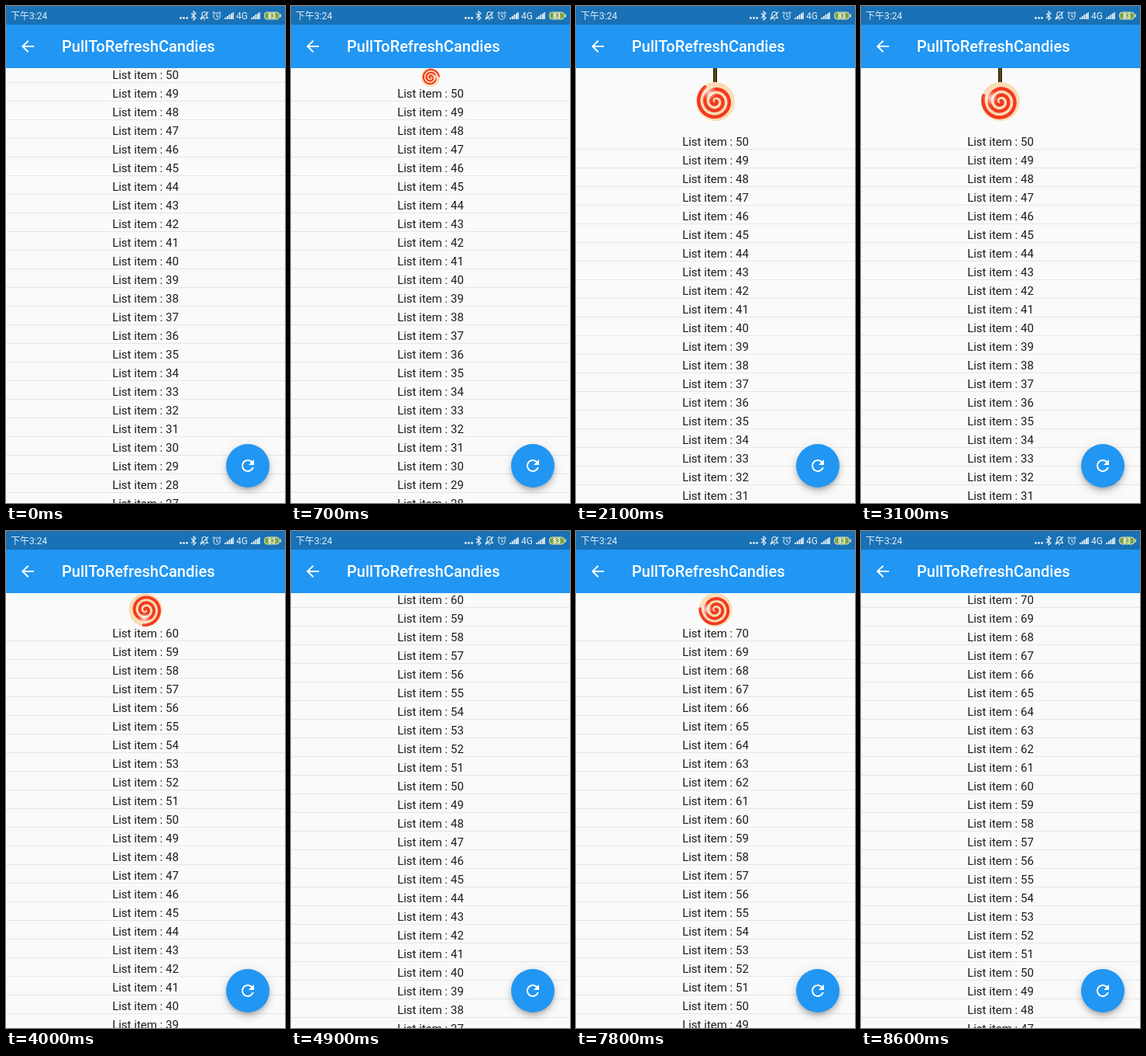
An HTML page for the animation above (8.7 s loop, 360 px wide and 640 px high).

```html
<!DOCTYPE html>
<html lang="en">
<head>
<meta charset="utf-8">
<title>PullToRefreshCandies</title>
<style>
  html, body { margin: 0; width: 100%; height: 100%; overflow: hidden; }
  body { position: relative; background: #fafafa; font-family: Roboto, "Noto Sans CJK SC", "Noto Sans CJK", sans-serif; }
  header { position: absolute; inset: 0 0 auto; height: 80px; background: #2196f3; color: #fff; }
  header svg { position: absolute; left: 0; top: 0; }
  h1 { position: absolute; left: 72px; top: 24px; margin: 0; font-size: 20px; font-weight: 500; line-height: 57px; white-space: nowrap; }
  main { position: absolute; inset: 80px 0 0; overflow: hidden; }
  .row { height: 24px; font-size: 15px; line-height: 18px; text-align: center; color: #1c1c1c; }
  .row::after { content: ""; display: block; height: 1px; background: #e3e7e6; }
  .candy { position: absolute; left: 0; top: 0; }
  .fab { position: absolute; left: 284px; top: 564px; width: 56px; height: 56px; border-radius: 50%; background: #2196f3;
    box-shadow: 0 3px 5px -1px rgba(0,0,0,.2), 0 6px 10px rgba(0,0,0,.14), 0 1px 18px rgba(0,0,0,.08); }
  .fab svg { position: absolute; left: 16px; top: 16px; }
</style>
</head>
<body>
<main>
  <svg class="candy" width="360" height="120">
    <defs>
      <radialGradient id="shine">
        <stop offset="0" stop-color="#fff" stop-opacity=".75"/>
        <stop offset="1" stop-color="#fff" stop-opacity="0"/>
      </radialGradient>
    </defs>
    <g id="stick">
      <rect x="177" width="5" height="120" fill="#33290a"/>
      <rect x="179" width="1" height="120" fill="#85701f"/>
    </g>
    <g id="pop">
      <circle r="25" fill="#fbdcb4"/>
      <path id="swirl" fill="none" stroke="#f23a20" stroke-width="4.500" stroke-linecap="round"/>
      <circle cx="14" r="10" fill="url(#shine)"/>
    </g>
  </svg>
  <div id="list"></div>
</main>

<header>
  <svg width="360" height="80">
    <rect width="360" height="24" fill="#1971b6"/>
    <g fill="#e4eef5" font-size="12">
      <text x="6" y="17">下午3:24</text>
      <circle cx="225.5" cy="15.5" r="1.4"/>
      <circle cx="229.5" cy="15.5" r="1.4"/>
      <circle cx="233.5" cy="15.5" r="1.4"/>
      <text x="297" y="17">4G</text>
      <path id="bars" d="M282 17v-2h2v2zm2.7 0v-4h2v4zm2.7 0v-6h2v6zm2.7 0v-7.500h2v7.500zm2.300 0v-9h1.500v9z"/>
      <use href="#bars" x="34"/>
    </g>
    <g fill="none" stroke="#e4eef5" stroke-width="1.100">
      <path d="M239 9.500l6 6-3 2.500V7l3 2.500-6 6"/>
      <path d="M251.500 15.500h9l-1.500-2v-3a3 3 0 0 0-6 0v3zM255 17.500h2M261 7.500l-10 10"/>
      <circle cx="272" cy="13" r="4.200"/>
      <path d="M272 10.500v2.800l2 1M266.500 9.500l2.500-2.200M277.500 9.500l-2.500-2.200"/>
    </g>
    <rect x="333.500" y="8" width="19" height="9" rx="3.500" fill="#7ba347" stroke="#e9edc0"/>
    <rect x="353.500" y="10.500" width="1.500" height="4" fill="#e9edc0"/>
    <text x="343" y="15.600" font-size="8.500" font-weight="700" text-anchor="middle" fill="#fff">83</text>
    <path transform="translate(16 40)" fill="#fff" d="M20 11H7.830l5.590-5.590L12 4l-8 8 8 8 1.410-1.410L7.830 13H20z"/>
  </svg>
  <h1>PullToRefreshCandies</h1>
</header>

<div class="fab">
  <svg width="24" height="24" fill="#fff"><path d="M17.650 6.350C16.200 4.900 14.210 4 12 4c-4.420 0-7.990 3.580-7.990 8s3.570 8 7.990 8c3.730 0 6.840-2.550 7.730-6h-2.080c-.82 2.330-3.040 4-5.650 4-3.310 0-6-2.690-6-6s2.690-6 6-6c1.660 0 3.140.69 4.220 1.780L13 11h7V4z"/></svg>
</div>

<script>
const LOOP = 8700, TICK = 100, ROWS = 24, CANDY = 50;
const DONE = [3900, 7700]; // each refresh adds ten items
// [time in ms, pull distance in px]
const PULL = [
  [0, 0], [400, 0], [500, 5], [700, 24], [1300, 76], [1600, 98], [1800, 98], [2000, 86], [DONE[0], 86], [4100, 0],
  [4900, 0], [5500, 95], [5600, 95], [5800, 86], [DONE[1], 86], [7900, 0], [LOOP, 0]
];
const $ = id => document.getElementById(id);
const list = $('list'), pop = $('pop'), stick = $('stick');

const rows = Array.from({ length: ROWS }, () => {
  const row = document.createElement('div');
  row.className = 'row';
  return list.appendChild(row);
});

function swirlPath(turns, inner, outer) {
  const steps = 90, points = [];
  for (let i = 0; i <= steps; i++) {
    const k = i / steps, a = (k - 1) * turns * 2 * Math.PI, r = inner + (outer - inner) * k;
    points.push((r * Math.cos(a)).toFixed(2) + ' ' + (r * Math.sin(a)).toFixed(2));
  }
  return 'M' + points.join('L');
}
$('swirl').setAttribute('d', swirlPath(2.7, 1, 23));

function pullAt(t) {
  const i = PULL.findIndex(p => p[0] > t);
  const [t0, y0] = PULL[i - 1], [t1, y1] = PULL[i];
  return y0 + (y1 - y0) * (t - t0) / (t1 - t0);
}

let shown;
function fillRows(first) {
  if (first === shown) return;
  shown = first;
  rows.forEach((row, i) => row.textContent = 'List item : ' + (first - i));
}

function draw(now) {
  const t = Math.floor(now % LOOP / TICK) * TICK;
  const pull = pullAt(t), size = Math.min(pull, CANDY);
  const angle = 45 + 0.686 * (t - 1300);
  fillRows(50 + 10 * DONE.filter(d => t > d).length);
  list.style.transform = `translateY(${Math.round(pull)}px)`;
  pop.setAttribute('transform', `translate(180 ${pull / 2}) rotate(${angle}) scale(${size / CANDY})`);
  stick.setAttribute('transform', `scale(1 ${(pull - size) / 2 / 120})`);
}

const start = performance.now();
function loop() {
  draw(performance.now() - start);
  requestAnimationFrame(loop);
}
loop();
</script>
</body>
</html>
```
